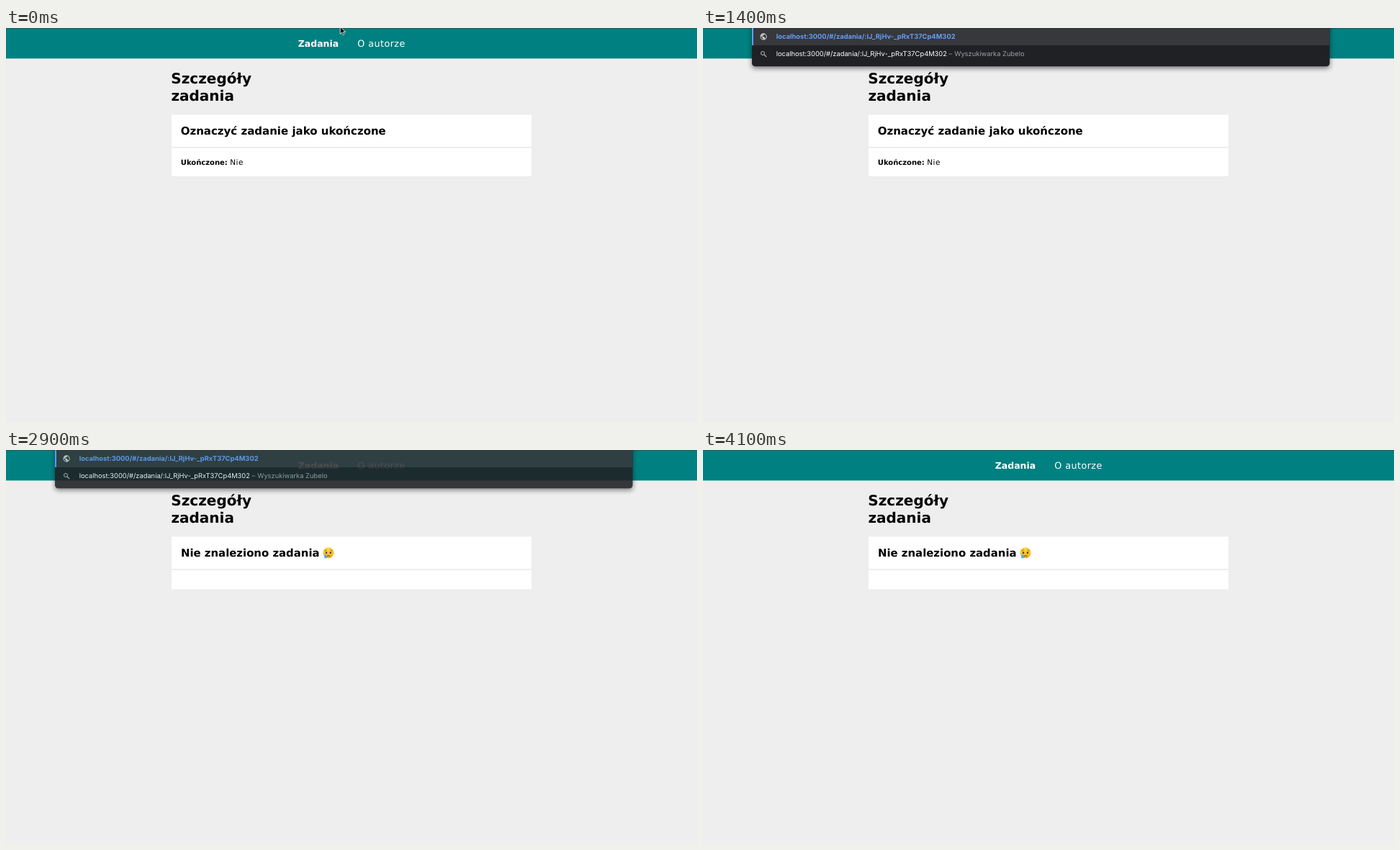
An HTML page for the animation above (6070 ms loop, 960 px wide and 547 px high).

```html
<!DOCTYPE html>
<html lang="pl">
<head>
<meta charset="utf-8">
<title>Szczegóły zadania</title>
<style>
  html, body { margin: 0; width: 100%; height: 100%; overflow: hidden; background: #eee; }
  svg { display: block; width: 100%; height: 100%; }
  text { text-rendering: geometricPrecision; white-space: pre; }
  .page { font-family: "DejaVu Sans", Montserrat, sans-serif; }
  .bold { font-weight: 700; }
  .h1 { font-size: 20px; }
  .h2 { font-size: 15px; }
  .nav { font-size: 12.5px; fill: #fff; }
  .link { font-size: 12.8px; letter-spacing: .4px; }
  .label { font-size: 10px; }
  .value { font-size: 10.5px; letter-spacing: .45px; }
  .menu { font: 9.33px Inter, sans-serif; }
</style>
</head>
<body>
<svg viewBox="0 0 960 547" preserveAspectRatio="none">
  <defs>
    <filter id="blur" x="-5%" y="-50%" width="110%" height="200%">
      <feGaussianBlur stdDeviation="3.6"/>
    </filter>
    <linearGradient id="skin" x2="0" y2="1">
      <stop offset="0" stop-color="#ffdf4a"/>
      <stop offset="1" stop-color="#f5a81c"/>
    </linearGradient>
  </defs>

  <g class="page">
    <rect width="960" height="547" fill="#eee"/>
    <rect width="960" height="42.4" fill="#008080"/>
    <rect width="960" height="1" fill="#1f5d5f"/>
    <text class="nav bold" x="405.7" y="26.4">Zadania</text>
    <text class="nav link" x="488.3" y="26.4">O autorze</text>

    <text class="h1 bold" x="229.3" y="76.6">Szczegóły</text>
    <text class="h1 bold" x="229.4" y="101.1">zadania</text>

    <rect id="card" x="230" y="120.4" width="500" height="85.2" fill="#fff"/>
    <rect x="230" y="165.4" width="500" height="1" fill="#ddd"/>

    <g id="found">
      <text class="h2 bold" x="242.7" y="148.3">Oznaczyć zadanie jako ukończone</text>
      <text class="label bold" x="242.8" y="189.5">Ukończone:</text>
      <text class="value" x="311.3" y="189.5">Nie</text>
    </g>

    <g id="missing">
      <text class="h2 bold" x="243" y="148.3" style="font-size:14.9px">Nie znaleziono zadania</text>
      <g transform="translate(448 142.6)">
        <circle r="7.6" fill="url(#skin)"/>
        <g fill="none" stroke="#6b3d0c" stroke-linecap="round">
          <path d="M-5.2-2.6Q-3.6-3-2.5-4.4M5.2-2.6Q3.6-3 2.5-4.4" stroke-width=".8"/>
          <path d="M-1.9 4.8Q0 2.8 2.2 4.8" stroke-width="1"/>
        </g>
        <g fill="#53300c">
          <ellipse cx="-2.9" cy="0" rx="1.1" ry="1.5"/>
          <ellipse cx="2.9" cy="0" rx="1.1" ry="1.5"/>
        </g>
        <path d="M-4 1.6Q-1.6 4.6-1.9 6A2.1 2 0 0 1-6.1 6Q-6.2 4.6-4 1.6Z" fill="#4fb4ea"/>
      </g>
    </g>
  </g>

  <g id="menu" class="menu">
    <rect x="68" y="-10" width="802.6" height="66" rx="4" fill="#000" opacity=".5" filter="url(#blur)"/>
    <rect x="68" y="-10" width="802.6" height="63.3" rx="4.5" fill="#202124"/>
    <rect x="68" width="802.6" height="24" fill="#36383b"/>
    <rect x="68" width="2" height="24" fill="#669df6"/>
    <path transform="translate(78.4 6.4) scale(.47)" fill="#c6c9cd" d="M12 2a10 10 0 1 0 0 20a10 10 0 0 0 0-20zm-1 17.9A8 8 0 0 1 4.2 10.2L9 15v1a2 2 0 0 0 2 2zm6.9-2.5A2 2 0 0 0 16 16h-1v-3a1 1 0 0 0-1-1H8v-2h2a1 1 0 0 0 1-1V7h2a2 2 0 0 0 2-2v-.4a8 8 0 0 1 2.9 12.8z"/>
    <g fill="none" stroke="#b4b7bb">
      <circle cx="83" cy="35" r="2.5"/>
      <path d="M85 37L88.2 40.2" stroke-width="1.2"/>
    </g>
    <text class="bold" x="101.7" y="15.4" fill="#669df6">localhost:3000/#/zadania/:lJ_RjHv-_pRxT37Cp4M302</text>
    <text x="101.7" y="39.3" fill="#fff">localhost:3000/#/zadania/:lJ_RjHv-_pRxT37Cp4M302</text>
    <g fill="#9aa0a6">
      <text x="341.5" y="39.3">–</text>
      <text x="349.2" y="39.3">Wyszukiwarka Zubelo</text>
    </g>
  </g>

  <path id="cursor" transform="translate(464.3 -2)" d="M0 0V10.3L2.3 8.1L3.9 11.6L5.6 10.9L4.1 7.5H7.3Z" stroke="#fff" stroke-width=".8"/>
</svg>
<script>
  const LOOP = 6070;
  const POINTER_OUT = 100, MENU_IN = 1400, RELOAD = 2900, MENU_OUT = 3000;
  const el = id => document.getElementById(id);
  const [card, found, missing, menu, cursor] =
    ["card", "found", "missing", "menu", "cursor"].map(el);
  const show = (node, on) => node.setAttribute("display", on ? "inline" : "none");

  function draw(t) {
    const reloaded = t >= RELOAD;
    show(cursor, t < POINTER_OUT);
    show(found, !reloaded);
    show(missing, reloaded);
    card.setAttribute("height", reloaded ? 72.8 : 85.2);
    show(menu, t >= MENU_IN && t < MENU_OUT);
    menu.setAttribute("opacity", reloaded ? .89 : 1);
  }

  const start = performance.now();
  function tick() {
    draw((performance.now() - start) % LOOP);
    requestAnimationFrame(tick);
  }
  tick();
</script>
</body>
</html>
```
